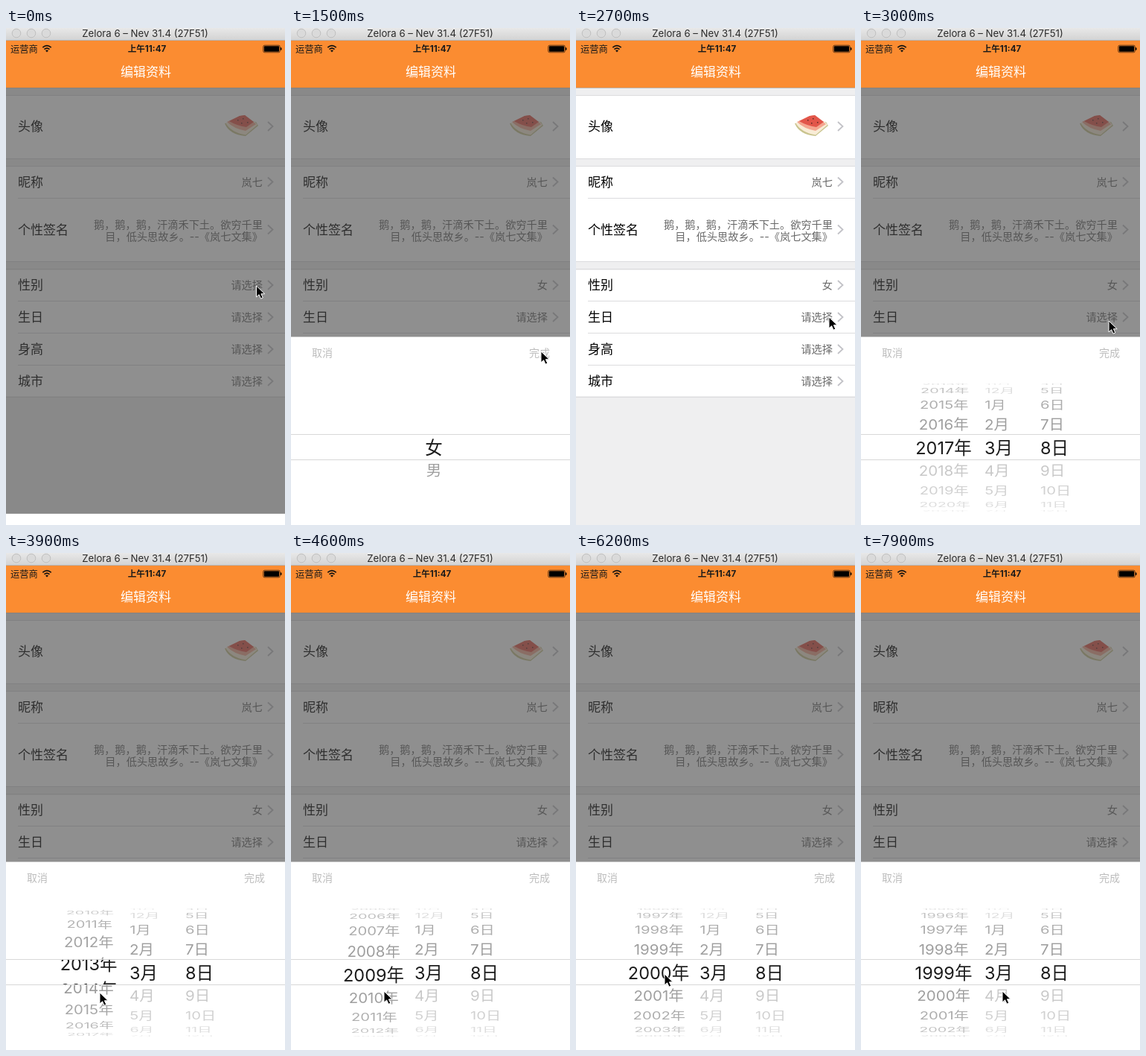
Recreate the animation shown at these times as an HTML page. Size 375 by 667 pixels, loop 8000 ms.

```html
<!DOCTYPE html>
<html lang="zh-CN">
<head>
<meta charset="utf-8">
<title>编辑资料</title>
<style>
  html, body { margin: 0; width: 100%; height: 100%; overflow: hidden; background: #efeff0; }
  svg { display: block; width: 375px; height: 667px; }
  text { font-family: Inter, "Noto Sans CJK SC", "Noto Sans CJK", sans-serif; white-space: pre; }
</style>
</head>
<body>
<svg id="stage" viewBox="0 0 375 667">
  <defs>
    <linearGradient id="chrome" x2="0" y2="1">
      <stop offset="0" stop-color="#e8e8e8"/><stop offset="1" stop-color="#d2d2d2"/>
    </linearGradient>
    <clipPath id="band"><rect y="546" width="375" height="33"/></clipPath>
    <clipPath id="around"><path d="M0 474H375V546H0ZM0 579H375V650H0Z"/></clipPath>
  </defs>

  <g id="form">
    <rect width="375" height="667" fill="#efeff0"/>
    <path fill="#fff" d="M0 91H375V175H0ZM0 186H375V313H0ZM0 325H375V494H0Z"/>
    <path stroke="#dcdcde" d="M0 90.5H375M0 175.5H375M0 185.5H375M0 313.5H375M0 323.5H375M16 228.5H375M16 366.5H375M16 409.5H375M16 452.5H375M0 495.5H375"/>
    <path fill="#c9c48e" d="M294 128Q300 143 322 145L339 131L336 126Z"/>
    <path fill="#f8ecd6" d="M295 127Q302 140 322 143.5L338 130L334 125Z"/>
    <path fill="#f4a58f" d="M314 118L297 126Q306 135 322 138L336 129L321 117Z"/>
    <path fill="#e2564a" d="M314 118L300 125Q310 131 323 133L333 126L321 117Z"/>
    <path fill="#5b2b25" d="M311 123h1.5v1.5h-1.5zM318 121h1.5v1.5h-1.5zM316 127h1.5v1.5h-1.5zM324 126h1.5v1.5h-1.5z"/>
  </g>
  <rect id="dim" y="80" width="375" height="587" fill="#4b4b4b" fill-opacity=".62"/>

  <g id="bar">
    <rect y="17" width="375" height="63" fill="#fb8c31"/>
    <path d="M0 80.5H375" stroke="#8a7a6c" stroke-opacity=".5"/>
    <rect width="375" height="17" fill="url(#chrome)"/>
    <path d="M0 16.5H375" stroke="#b6b2b0"/>
    <g fill="#dadada" stroke="#c0c0c0">
      <circle cx="14" cy="7" r="5.8"/><circle cx="34" cy="7" r="5.8"/><circle cx="54" cy="7" r="5.8"/>
    </g>
    <g fill="none" stroke="#111" stroke-width="1.7">
      <path d="M49.3 26.2Q55 21.2 60.7 26.2M51.5 28.6Q55 25.6 58.5 28.6"/>
    </g>
    <path fill="#111" d="M53 30.3Q55 28.9 57 30.3L55 32.5Z"/>
    <rect x="345.7" y="23.2" width="22.6" height="9.6" rx="2" fill="none" stroke="#000" stroke-width=".6"/>
    <rect x="346.8" y="24.3" width="20.4" height="7.4" rx="1" fill="#000"/>
    <path fill="#000" d="M369 26q1.6 0 1.6 2t-1.6 2z"/>
  </g>

  <g id="sheet">
    <rect y="414.5" width="375" height="260" fill="#fff"/>
    <g id="gender"></g>
    <g id="date"></g>
    <path stroke="#d8d8d8" d="M0 545.5H375M0 579.5H375"/>
  </g>
  <path id="cursor" d="M0 0V15L3.6 11.8L6 17.2L8.8 16L6.4 10.8H11.2Z" fill="#000" stroke="#fff" stroke-linejoin="round"/>
</svg>
<script>
const $ = id => document.getElementById(id);

function add(parent, tag, attrs) {
  const el = document.createElementNS("http://www.w3.org/2000/svg", tag);
  for (const k in attrs) el.setAttribute(k, attrs[k]);
  return parent.appendChild(el);
}

// cy is the optical middle of the line
function label(parent, str, x, cy, size, fill, anchor = "start", weight = 400) {
  const el = add(parent, "text", {
    x, y: cy + size * 0.37, "font-size": size, fill,
    "text-anchor": anchor, "font-weight": weight
  });
  el.textContent = str;
  return el;
}

// Form
const form = $("form"), GREY = "#6a6a6a";
const value = (str, cy) => label(form, str, 345, cy, 14.2, GREY, "end");
const rows = [["头像", 132], ["昵称", 206.5], ["个性签名", 270.5], ["性别", 345],
              ["生日", 388], ["身高", 431], ["城市", 474]];
for (const [name, y] of rows) {
  label(form, name, 16, y, 17, "#000");
  add(form, "path", { d: `M352 ${y - 6}l6.5 6l-6.5 6`, fill: "none", stroke: "#c2c2c7", "stroke-width": 1.8 });
}
value("岚七", 206.5);
value("鹅，鹅，鹅，汗滴禾下土。欲穷千里", 263.5);
value("目，低头思故乡。--《岚七文集》", 279.5);
const sex = value("", 345);
for (const y of [388, 431, 474]) value("请选择", y);

// Header
const bar = $("bar");
label(bar, "Zelora 6 – Nev 31.4 (27F51)", 187, 7.5, 13.2, "#2a2a2a", "middle");
label(bar, "运营商", 6, 28, 12.3, "#1a1a1a");
label(bar, "上午11:47", 189.5, 28, 11.6, "#1a1a1a", "middle", 700);
label(bar, "编辑资料", 188, 59, 17, "#fff", "middle");

// Sheet
label($("sheet"), "取消", 28, 436, 14, "#bdbdbd");
label($("sheet"), "完成", 348, 436, 14, "#bdbdbd", "end");

const MID = 563, RADIUS = 85.5, STEP = 21.2 * Math.PI / 180;

// A picker column: a cylinder of rows plus a magnified copy inside the band
function wheel(parent, x, anchor, name, pale, drift = 0) {
  const layers = ["around", "band"].map(id => {
    const g = add(parent, "g", { "clip-path": `url(#${id})` });
    return Array.from({ length: 9 }, () => label(g, "", 0, 0, id == "band" ? 23.5 : 20.6, "#1c1c1c", anchor));
  });
  return v => layers.forEach((texts, big) => texts.forEach((el, k) => {
    const n = Math.round(v) + k - 4, a = (n - v) * STEP, c = Math.cos(a);
    el.textContent = c > 0.02 ? name(n) : "";
    const w = big ? 1 : 0.93 + 0.07 * c;
    const y = MID + RADIUS * Math.sin(a) * (big ? 1.1 : 1);
    el.setAttribute("transform", `translate(${x + drift * (1 - c)} ${y}) scale(${w} ${big ? 1 : w * Math.max(c, 0.02)})`);
    if (!big) {
      el.setAttribute("fill", pale(n) ? "#c6c6c6" : "#999");
      el.setAttribute("opacity", 0.25 + 0.75 * c);
    }
  }));
}
const wrap = (n, len) => (n - 1 + len) % len + 1;
const year = wheel($("date"), 111, "middle", n => n + "年", n => n > 2017, 3);
wheel($("date"), 166, "start", n => wrap(n, 12) + "月", n => wrap(n, 12) > 3, 1)(3);
wheel($("date"), 241, "start", n => wrap(n, 31) + "日", n => n > 8)(8);
wheel($("gender"), 192, "middle", n => ["女", "男"][n] || "", () => false)(0);

// Motion
const clamp = p => Math.min(1, Math.max(0, p));
const inOut = p => p < 0.5 ? 2 * p * p : 1 - 2 * (1 - p) * (1 - p);
const out = p => 1 - (1 - p) * (1 - p);
const linear = p => p;
const ramp = (t, start, len) => inOut(clamp((t - start) / len));

// Keys: [time, values, ease into this key]
function track(keys, t) {
  const i = keys.findIndex(k => k[0] > t);
  if (i < 0) return keys[keys.length - 1][1];
  if (i == 0) return keys[0][1];
  const [t0, a] = keys[i - 1], [t1, b, ease = inOut] = keys[i];
  const p = ease((t - t0) / (t1 - t0));
  return a.map((s, j) => s + (b[j] - s) * p);
}

const years = [
  [3470, [2017]], [3760, [2015.1], linear], [4400, [2010.6], out], [4600, [2008.92], linear],
  [6050, [2000], out], [6350, [2000]], [7000, [1999]]
];
const pointer = [
  [800, [336.5, 346]], [1180, [336, 434]], [1800, [336, 434]], [2400, [340, 388]], [2720, [340, 388]],
  [2980, [333, 393]], [3020, [333, 393]], [3290, [127, 530]], [3470, [127, 530]],
  [3760, [126, 588], linear], [3900, [126, 590]], [4350, [126, 535]], [4400, [126, 536]],
  [4600, [125, 588], linear], [4720, [125, 597], out], [5300, [121, 562]], [6200, [119, 565]],
  [6350, [119, 565]], [7000, [121, 593]], [7100, [121, 593]], [7490, [188, 573]],
  [7810, [188, 573]], [7890, [190, 588]]
];

function draw(t) {
  const date = t > 2200;
  const up = date ? ramp(t, 2715, 260) : ramp(t, -44, 260) - ramp(t, 1530, 270);
  $("sheet").setAttribute("transform", `translate(0 ${252.5 * (1 - up)})`);
  $("dim").setAttribute("opacity", date ? +(t > 2715) : 1 - ramp(t, 1530, 270));
  $("gender").setAttribute("display", date ? "none" : "inline");
  $("date").setAttribute("display", date ? "inline" : "none");
  sex.textContent = t < 1460 ? "请选择" : "女";
  year(track(years, t)[0]);
  $("cursor").setAttribute("transform", `translate(${track(pointer, t).join(" ")})`);
}

const born = performance.now();
function tick() {
  draw((performance.now() - born) % 8000);
  requestAnimationFrame(tick);
}
tick();
</script>
</body>
</html>
```
